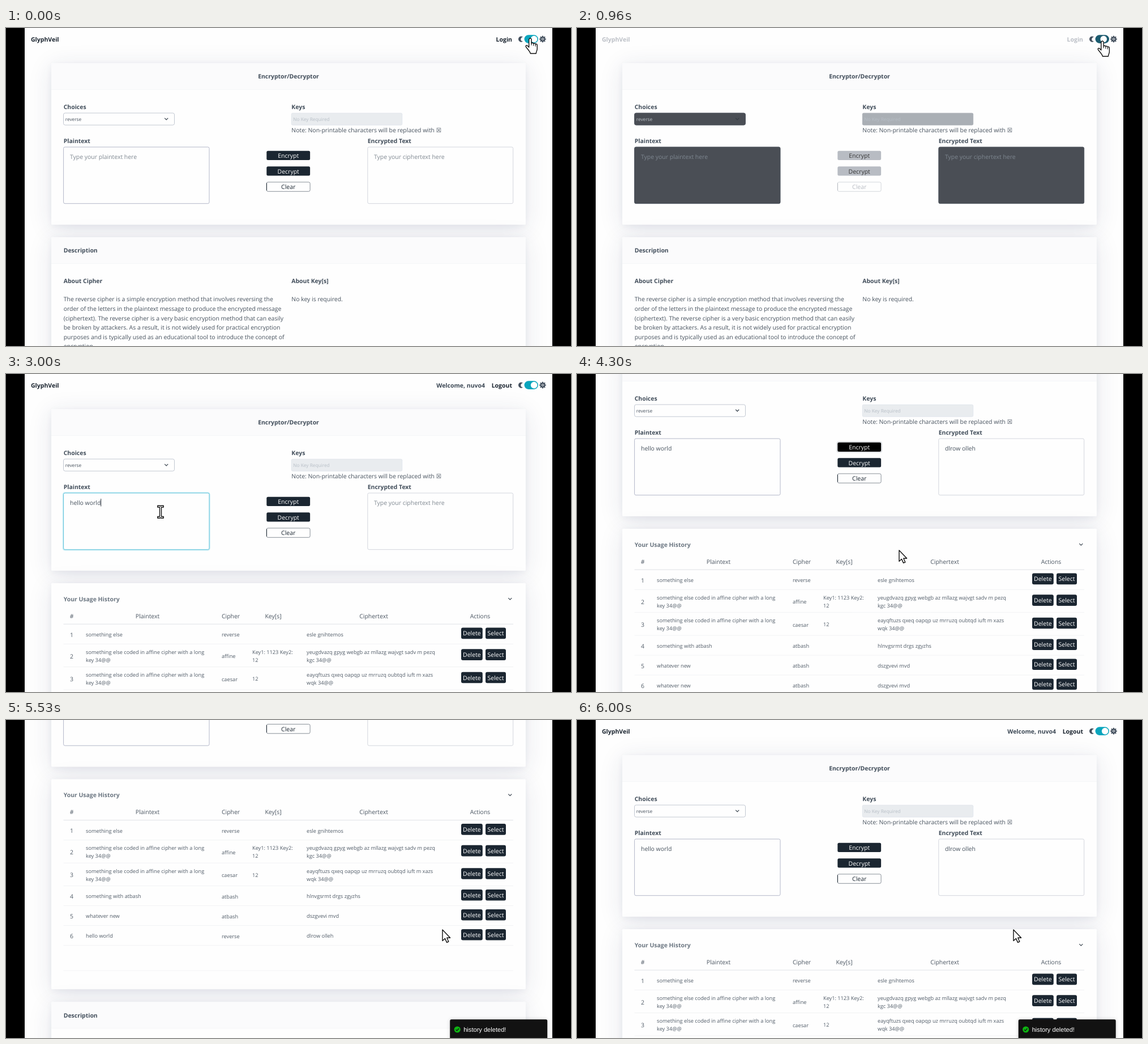
These frames come from a looping animation (998x561 px, 6030 ms). An HTML page with a canvas:

```html
<!DOCTYPE html>
<html lang="en">
<head>
<meta charset="utf-8">
<title>Cipher page demo</title>
<style>
html, body { margin: 0; width: 100%; height: 100%; overflow: hidden; background: #000; }
canvas { display: block; }
</style>
</head>
<body>
<canvas id="stage" width="998" height="561"></canvas>
<script>
const ctx = document.getElementById('stage').getContext('2d');
ctx.textRendering = 'geometricPrecision';
const LOOP = 6030;
const SANS = '"Open Sans", "Noto Sans", "DejaVu Sans", sans-serif';
const BODY = 10.44, CELL = 9.2, SMALL = 8.3;
const APP = 'GlyphVeil', USER = 'nuvo4';

// Times of the main events, in ms
const DARK = 60, LIGHT = 960, LOGIN = 1600, FOCUS = 1960, ENCRYPT = 3660, REMOVE = 5200, TOAST = 5270;
const KEYS = [2120, 2180, 2230, 2290, 2360, 2430, 2500, 2560, 2700, 2930, 3000];

const clamp = v => Math.max(0, Math.min(1, v));
const lerp = (a, b, p) => a + (b - a) * p;
const span = (t, a, b) => clamp((t - a) / (b - a));
const smooth = p => (1 - Math.cos(Math.PI * p)) / 2;

function mix(a, b, p) {
  const ch = (c, i) => parseInt(c.substr(1 + 2 * i, 2), 16);
  return 'rgb(' + [0, 1, 2].map(i => Math.round(lerp(ch(a, i), ch(b, i), p))) + ')';
}

function text(s, x, y, color, { size = BODY, bold = false, align = 'left', family = SANS } = {}) {
  ctx.font = `${bold ? 700 : 400} ${size}px ${family}`;
  ctx.textAlign = align;
  ctx.fillStyle = color;
  ctx.fillText(s, x, y + size * 0.357);
}

function box(x, y, w, h, r, fill, stroke, width = 1) {
  ctx.beginPath();
  ctx.roundRect(x, y, w, h, r);
  if (fill) { ctx.fillStyle = fill; ctx.fill(); }
  if (stroke) { ctx.strokeStyle = stroke; ctx.lineWidth = width; ctx.stroke(); }
}

function line(points, color, width = 1) {
  ctx.beginPath();
  points.forEach(([x, y]) => ctx.lineTo(x, y));
  ctx.strokeStyle = color;
  ctx.lineWidth = width;
  ctx.stroke();
}

function dot(x, y, r, color) {
  ctx.beginPath();
  ctx.arc(x, y, r, 0, 7);
  ctx.fillStyle = color;
  ctx.fill();
}

const chevron = (x, y, color) => line([[x - 3, y - 1.5], [x, y + 1.5], [x + 3, y - 1.5]], color, 1.2);

// State that depends on time only
function themeAt(t) {
  if (t < DARK) return 1;
  if (t < LIGHT) return 1 - span(t, DARK, DARK + 100);
  return Math.min(1, 0.2 + (t - LIGHT) / 120);
}

function scrollAt(t) {
  if (t < 5560) return 264.5 * smooth(span(t, 4054, 4654));
  return 264.5 * (1 - span(t, 5560, 6000)) ** 4;
}

function track(keys, t) {
  let i = 0;
  while (i < keys.length - 2 && t >= keys[i + 1][0]) i++;
  const [a, b] = [keys[i], keys[i + 1]];
  const p = smooth(span(t, a[0], b[0]));
  return a.slice(1).map((v, k) => lerp(v, b[k + 1], p));
}

const POINTER = [
  [30, 923.3, 17.5], [630, 924.5, 25], [730, 925.4, 22.5], [1050, 925.4, 22.5], [1350, 880, 20],
  [1600, 880, 20], [1940, 273, 243], [3230, 273, 243], [3580, 505, 226], [3780, 505, 226],
  [4280, 569, 311], [4400, 569, 311], [4980, 820, 377], [5210, 820, 377], [5500, 771, 370], [6000, 771, 370]
];
const SLIDE = [[0, 220], [0.6, -13], [0.75, 4.5], [0.9, -2.7], [1, 0]];

// Page parts
function card(y, h, band, lit) {
  const fill = lit ? '#fefefe' : '#1a2028';
  [[44, 6, 0.11], [12, 3, 0.06]].forEach(([blur, drop, alpha]) => {
    ctx.save();
    ctx.shadowColor = `rgba(35,45,95,${alpha})`;
    ctx.shadowBlur = blur;
    ctx.shadowOffsetY = drop;
    box(80, y, 838, h, 2, fill);
    ctx.restore();
  });
  if (band) {
    box(80, y, 838, 46, [2, 2, 0, 0], lit ? '#fbfbfc' : '#222932');
    ctx.fillStyle = lit ? '#f3f4f6' : '#2c343d';
    ctx.fillRect(80, y + 46, 838, 0.8);
  }
}

function header(t, theme, user) {
  const ink = mix('#e6e8ee', '#18222d', theme);
  const icon = t < DARK || t >= LIGHT ? '#44505e' : '#c9d0d8';
  text(APP, 44, 20, ink, { bold: true, size: 10.5 });
  if (user) text('Welcome, ' + USER, 846, 20, '#3b4754', { bold: true, size: 10.5, align: 'right' });
  text(user ? 'Logout' : 'Login', 894, 20, ink, { bold: true, size: 10.5, align: 'right' });

  // Moon
  ctx.beginPath();
  ctx.arc(910, 19.7, 5, -0.9, 0.9, true);
  ctx.arc(913.4, 19.7, 4, 1.9, -1.9);
  ctx.fillStyle = icon;
  ctx.fill();

  const knob = t >= LIGHT ? Math.min(1, 0.75 + (t - LIGHT) / 160) : theme;
  box(915.5, 12.3, 24.5, 14.6, 7.3, mix('#20485a', '#0aa5bd', theme));
  dot(lerp(922.5, 932.7, knob), 19.6, 5.8, '#fff');

  // Gear
  for (let i = 0; i < 8; i++) {
    const a = i * Math.PI / 4, c = Math.cos(a), s = Math.sin(a);
    line([[948 + 3 * c, 19.6 + 3 * s], [948 + 5.8 * c, 19.6 + 5.8 * s]], icon, 2.2);
  }
  dot(948, 19.6, 4.3, icon);
  dot(948, 19.6, 2.1, '#e4e7ea');
  dot(948, 19.6, 1.1, icon);
}

function button(label, y, fill, color, border) {
  box(460.3, y - 8, 76.8, 16.4, 2.5, fill, border, 0.8);
  text(label, 498.7, y + 0.6, color, { align: 'center', size: 10.5 });
}

function form(t, theme, lit) {
  const label = lit ? '#414d5a' : '#dee2e6';
  const field = mix('#1a2028', '#fefefe', theme);
  const ink = mix('#dee2e6', '#46515d', theme);
  const bold = { bold: true, size: 10.45 };
  card(62, 285, true, lit);
  text('Encryptor/Decryptor', 499, 85.5, label, { ...bold, align: 'center' });
  text('Choices', 101.7, 139, label, bold);
  text('Keys', 504.3, 139, label, bold);
  text('Plaintext', 101.7, 199.3, label, bold);
  text('Encrypted Text', 638.7, 199.3, label, bold);

  box(101.5, 150, 196, 21.2, 3, field, mix('#2a323c', '#bcc2cd', theme), 0.9);
  text('reverse', 104.7, 161, ink, { size: SMALL });
  chevron(283.2, 160.3, mix('#343a40', '#3a4550', theme));
  box(504.3, 150.2, 195.4, 21, 2, mix('#999fa6', '#e9ecef', theme), mix('#999fa6', '#dde2ea', theme), 0.8);
  text('No Key Required', 507.3, 161, '#b7bec6', { size: SMALL });
  text('Note: Non-printable characters will be replaced with ☒', 504.3, 180.3, lit ? '#46515d' : '#dee2e6');

  // Text areas
  const focus = t < ENCRYPT ? span(t, FOCUS, FOCUS + 120) : 1 - span(t, ENCRYPT, ENCRYPT + 80);
  const edge = mix('#2a323c', '#b3b7c9', theme);
  if (focus) box(101, 209.5, 258.5, 101, 3, null, `rgba(90,200,225,${0.3 * focus})`, 2.5);
  box(101.6, 210, 257.4, 99.7, 2.5, field, focus ? mix('#b3b7c9', '#5cc2d9', focus) : edge);
  box(638.8, 210, 256.9, 99.7, 2.5, field, mix('#2a323c', '#ced2da', theme), 0.9);

  const typed = 'hello world'.slice(0, KEYS.filter(k => t >= k).length);
  text(typed || 'Type your plaintext here', 113, 227.2, typed ? ink : '#7f8891');
  if (t >= FOCUS && t < ENCRYPT) {
    const w = typed ? ctx.measureText(typed).width : 0;
    ctx.fillStyle = typed ? '#1c2530' : '#8a9299';
    ctx.fillRect(113 + w, 220, 0.9, 13.5);
  }
  const done = t >= ENCRYPT;
  text(done ? 'dlrow olleh' : 'Type your ciphertext here', 650, 227.2, done ? ink : '#7f8891');

  const solid = mix('#e1e4ea', '#1b2631', theme), onSolid = mix('#000000', '#ffffff', theme);
  const active = t >= ENCRYPT && t < REMOVE;
  if (active) box(459, 215.5, 79.4, 18.8, 3.5, null, '#d9dce0', 1.6);
  button('Encrypt', 224.7, active ? '#000000' : solid, onSolid);
  button('Decrypt', 252.2, solid, onSolid);
  button('Clear', 279.9, lit ? '#fefefe' : '#1a2028', solid, mix('#e1e4ea', '#6b747e', theme));
  line([[460.4, 273.5], [460.4, 286.5]], solid);
}

const ABOUT = [
  'The reverse cipher is a simple encryption method that involves reversing the',
  'order of the letters in the plaintext message to produce the encrypted message',
  '(ciphertext). The reverse cipher is a very basic encryption method that can easily',
  'be broken by attackers. As a result, it is not widely used for practical encryption',
  'purposes and is typically used as an educational tool to introduce the concept of',
  'encryption.'
];

function description(y, lit) {
  const label = lit ? '#414d5a' : '#dee2e6', ink = lit ? '#46515d' : '#c9ced4';
  const bold = { bold: true, size: 10.45 };
  card(y, 260, true, lit);
  text('Description', 101.7, y + 23.4, label, bold);
  text('About Cipher', 101.7, y + 77, label, bold);
  text('About Key[s]', 504.3, y + 77, label, bold);
  ABOUT.forEach((s, i) => text(s, 101.7, y + 109.6 + i * 16.6, ink));
  text('No key is required.', 504.3, y + 109.6, ink);
}

const LONG = ['something else coded in affine cipher with a long', 'key 34@@'];
const ROWS = [
  [['something else'], 'reverse', [], ['esle gnihtemos']],
  [LONG, 'affine', ['Key1: 1123 Key2:', '12'], ['yeugdvazq gpyg webgb az mllazg wajvgt sadv m pezq', 'kgc 34@@']],
  [LONG, 'caesar', ['12'], ['eayqftuzs qxeq oapqp uz mrruzq oubtqd iuft m xazs', 'wqk 34@@']],
  [['something with atbash'], 'atbash', [], ['hlnvgsrmt drgs zgyzhs']],
  [['whatever new'], 'atbash', [], ['dszgvevi mvd']],
  [['whatever new'], 'atbash', [], ['dszgvevi mvd']],
  [['hello world'], 'reverse', [], ['dlrow olleh']]
];

function history(t) {
  const rows = ROWS.filter((_, i) => (i !== 5 || t < REMOVE) && (i !== 6 || t >= ENCRYPT));
  const extra = (rows.length - 6) * 35;
  const ink = '#505b67', rule = '#f1f2f4';
  card(369, 370.5 + extra, false, true);
  text('Your Usage History', 101.7, 397, '#6b7681', { bold: true, size: 10.45 });
  chevron(890.3, 396.6, '#3a4550');
  const heads = [['#', 116], ['Plaintext', 250], ['Cipher', 397], ['Key[s]', 472], ['Ciphertext', 649.5], ['Actions', 837.5]];
  heads.forEach(([s, x]) => text(s, x, 427.2, '#4a5561', { align: 'center' }));
  line([[101.5, 441.2], [896, 441.2]], '#dfe2e6');

  let top = 441.3;
  const cell = (lines, x, y) => lines.forEach((s, k) =>
    text(s, x, y + (k - (lines.length - 1) / 2) * 14.2, ink, { size: CELL }));
  rows.forEach(([plain, cipher, key, out], i) => {
    const h = plain.length > 1 ? 40.4 : 35;
    const y = top + h / 2 + 1;
    text(String(i + 1), 116, y + 0.3, ink, { align: 'center' });
    cell(plain, 141, y);
    cell([cipher], 381, y + 0.4);
    cell(key, 435, y);
    cell(out, 531, y);
    [['Delete', 804, 37.8], ['Select', 847, 36]].forEach(([s, x, w]) => {
      box(x, y - 12.2, w, 19.6, 3, '#1b2631');
      text(s, x + w / 2, y - 2.1, '#fff', { align: 'center', size: 10.5 });
    });
    top += h;
    line([[101.5, top], [896, top]], rule, 0.9);
  });
  line([[101.5, 706.5 + extra], [896, 706.5 + extra]], rule, 0.9);
  description(762 + extra, true);
}

function toast(t) {
  if (t < TOAST) return;
  const x = 779.7 + track(SLIDE, (t - TOAST) / 347)[0];
  ctx.save();
  ctx.shadowColor = 'rgba(0,0,0,0.18)';
  ctx.shadowBlur = 6;
  box(x, 528.3, 172, 36, 2.5, '#121212');
  ctx.restore();
  dot(x + 13, 546, 5.6, '#0db312');
  line([[x + 10.4, 546.2], [x + 12.3, 548.1], [x + 15.7, 544.3]], '#121212', 1.3);
  text('history deleted!', x + 24, 546.2, '#fff', { size: 11.1, family: '"Liberation Sans", Arial, sans-serif' });
}

const SHAPES = {
  arrow: 'M0 0V19.5L4.4 15.4L7.6 22.4L10.8 21L7.8 14.2H13.6Z',
  hand: 'M1 1.6C2.5 -.3 4.6 .6 4.8 2.6V9.4C6 8.2 8 8.6 8.5 10C9.8 9 11.6 9.5 12 11C13.4 10.2 15 11 15 13V19.5C15 22 13.2 23.5 13 27.5H3C2.6 24 -1.5 20.5 -5 15.6C-6 13.6 -3.6 12.4 -2 14L.4 16.4V3Z',
  beam: 'M-5.2 -10.7H-1L0 -9.9L1 -10.7H5.2V-8H1.5V8.5H5.2V11.2H1L0 10.4L-1 11.2H-5.2V8.5H-1.5V-8H-5.2Z'
};

function pointer(t, scroll) {
  const [x, y] = track(POINTER, t);
  const py = y + scroll;
  const inside = (l, r, a, b) => x > l && x < r && py > a && py < b;
  let kind = 'arrow';
  if (inside(101, 359, 210, 310)) kind = 'beam';
  else if (inside(860, 942, 0, 32) || inside(460, 537, 216, 233) || inside(804, 842, 632, 655)) kind = 'hand';
  ctx.save();
  ctx.translate(x, y);
  const shape = new Path2D(SHAPES[kind]);
  ctx.fillStyle = '#fff';
  ctx.strokeStyle = '#101010';
  ctx.lineWidth = 1.4;
  ctx.lineJoin = 'round';
  ctx.fill(shape);
  ctx.stroke(shape);
  if (kind === 'hand') [[4.8, 9], [8.5, 10], [12, 11]].forEach(([a, b]) => line([[a, b], [a, b + 4]], '#101010', 1.1));
  ctx.restore();
}

function draw(t) {
  const theme = themeAt(t), lit = t < DARK || t >= LIGHT;
  const scroll = scrollAt(t), user = t >= LOGIN;
  ctx.fillStyle = '#000';
  ctx.fillRect(0, 0, 998, 561);
  ctx.save();
  ctx.beginPath();
  ctx.rect(33, 0, 932, 561);
  ctx.clip();
  ctx.fillStyle = lit ? '#fefefe' : '#151a21';
  ctx.fillRect(33, 0, 932, 561);
  ctx.save();
  ctx.translate(0, -scroll);
  form(t, theme, lit);
  if (user) history(t);
  else description(369, lit);
  header(t, theme, user);
  ctx.restore();
  toast(t);
  pointer(t, scroll);
  ctx.restore();
}

function tick() {
  draw(performance.now() % LOOP);
  requestAnimationFrame(tick);
}
tick();
</script>
</body>
</html>
```
